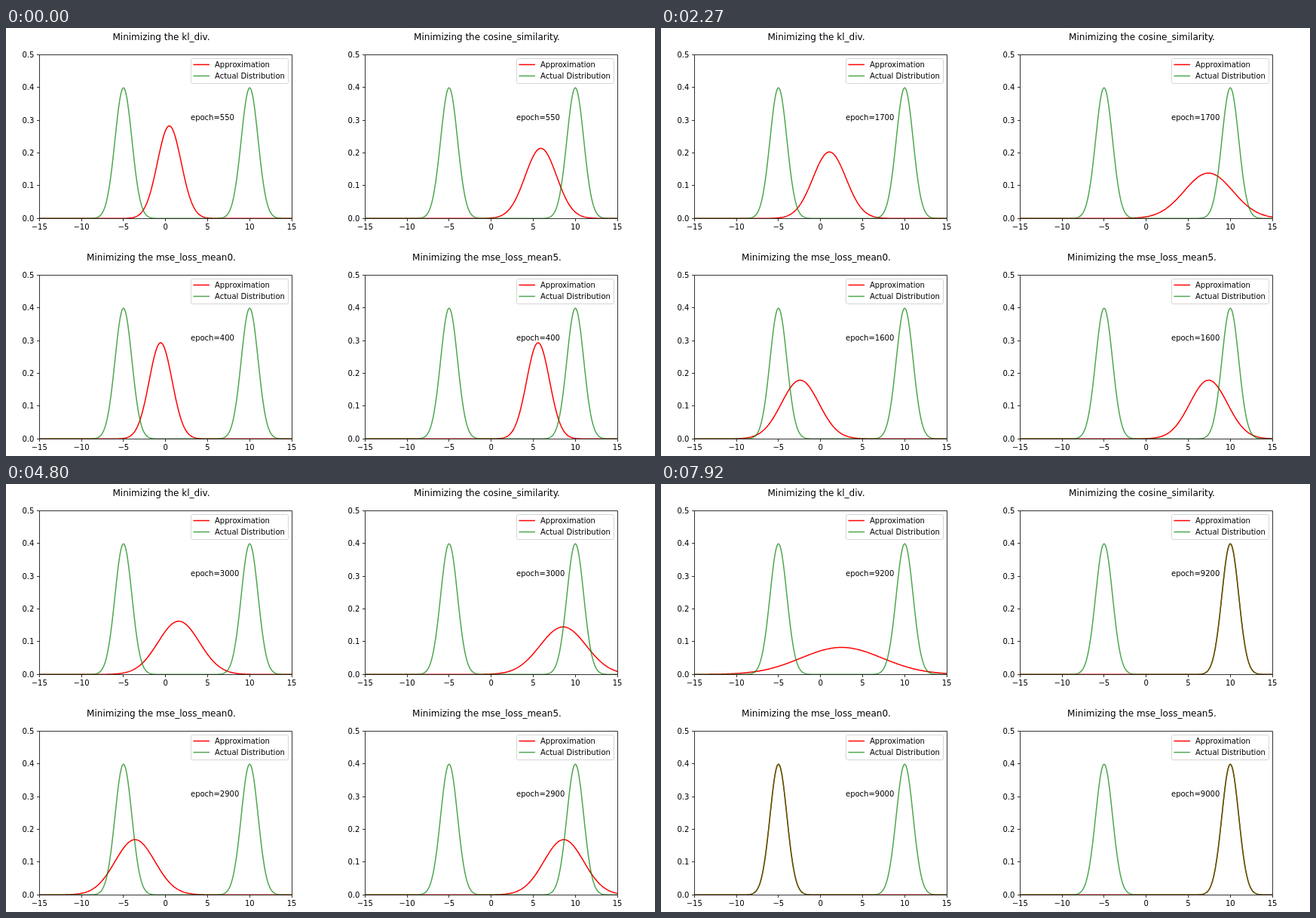
An HTML page with a canvas for the animation above (8 s loop, 861 by 567 pixels).

```html
<!DOCTYPE html>
<html lang="en">
<head>
<meta charset="utf-8">
<title>Minimizing losses</title>
<style>
  html, body { margin: 0; width: 100%; height: 100%; overflow: hidden; background: #fff; }
  canvas { display: block; }
</style>
</head>
<body>
<canvas id="stage" width="861" height="567"></canvas>
<script>
const ctx = document.getElementById('stage').getContext('2d');
const LOOP = 8000, SLOT = LOOP / 105, STEP = 97.5;
const RED = '#f00', GREEN = 'rgba(0,128,0,0.7)';
const AXES = { left: 44.2, bottom: 252.3, width: 334.9, height: 217 };

// Rows of [epoch, mean, sigma]
const KL = [[550, .45, 1.412], [1400, .93, 1.84], [2000, 1.18, 2.083], [2400, 1.36, 2.235],
  [3000, 1.57, 2.455], [7800, 2.45, 4.267], [9200, 2.5, 4.835]];
const COSINE = [[550, 5.91, 1.864], [1400, 7.07, 2.732], [2000, 7.7, 2.96], [2400, 8.04, 2.977],
  [3000, 8.55, 2.75], [4000, 9.4, 2.05], [5000, 9.9, 1.2], [5600, 10, 1], [9200, 10, 1]];
const MSE = [[400, -.58, 1.36], [1300, -2.06, 2.081], [1900, -2.73, 2.333], [2300, -3.1, 2.417],
  [2900, -3.63, 2.367], [3900, -4.4, 1.85], [4900, -4.9, 1.2], [5500, -5, 1], [9200, -5, 1]];
const MSE_MIRRORED = MSE.map(([epoch, mean, sigma]) => [epoch, 5 - mean, sigma]);

// phase and lag are counted in training snapshots
const panels = [
  { x: 0, y: 0, name: 'kl_div', knots: KL, phase: .1, lag: 0 },
  { x: 432, y: 0, name: 'cosine_similarity', knots: COSINE, phase: .1, lag: 0 },
  { x: 0, y: 292, name: 'mse_loss_mean0', knots: MSE, phase: .98, lag: 3 },
  { x: 432, y: 292, name: 'mse_loss_mean5', knots: MSE_MIRRORED, phase: .98, lag: 3 },
];

const toX = v => AXES.left + (v + 15) / 30 * AXES.width;
const toY = v => AXES.bottom - v / .5 * AXES.height;
const crisp = v => Math.floor(v) + .5;
const gauss = (x, mean, sigma) =>
  Math.exp(-(((x - mean) / sigma) ** 2) / 2) / (sigma * Math.sqrt(2 * Math.PI));
const twoPeaks = x => gauss(x, -5, 1) + gauss(x, 10, 1);

function epochAt(n) {
  if (n <= 49) return 550 + 50 * n;
  if (n <= 59) return 3000 + 400 * (n - 49);
  return 7000 + 100 * (n - 59);
}

// Monotone cubic interpolation of one column
function interpolate(knots, epoch, col) {
  const last = knots.length - 2;
  const slope = i => (knots[i + 1][col] - knots[i][col]) / (knots[i + 1][0] - knots[i][0]);
  const tangent = i => {
    if (i === 0) return slope(0);
    if (i > last) return slope(last);
    const a = slope(i - 1), b = slope(i);
    return a * b <= 0 ? 0 : 2 * a * b / (a + b);
  };
  let i = 0;
  while (i < last && epoch > knots[i + 1][0]) i++;
  const h = knots[i + 1][0] - knots[i][0];
  const u = (epoch - knots[i][0]) / h, v = 1 - u;
  return v * v * (1 + 2 * u) * knots[i][col] + u * u * (1 + 2 * v) * knots[i + 1][col]
    + h * u * v * (v * tangent(i) - u * tangent(i + 1));
}

function stroke(color, width) {
  ctx.strokeStyle = color;
  ctx.lineWidth = width;
  ctx.stroke();
}

function line(x1, y1, x2, y2, color, width) {
  ctx.beginPath();
  ctx.moveTo(x1, y1);
  ctx.lineTo(x2, y2);
  stroke(color, width);
}

function text(str, x, y, align = 'left', size = 10) {
  ctx.font = `${size}px "DejaVu Sans", sans-serif`;
  ctx.textAlign = align;
  ctx.fillStyle = '#000';
  ctx.fillText(str, x, y);
}

function curve(f, color) {
  ctx.beginPath();
  for (let i = 0; i <= 300; i++) {
    const x = -15 + i / 10;
    ctx.lineTo(toX(x), toY(f(x)));
  }
  stroke(color, 1.5);
}

function drawAxes() {
  const left = crisp(toX(-15)), bottom = crisp(toY(0));
  ctx.lineCap = 'butt';
  ctx.beginPath();
  ctx.rect(left, crisp(toY(.5)), crisp(toX(15)) - left, crisp(toY(.5)) * -1 + bottom);
  stroke('#000', .8);
  for (let v = -15; v <= 15; v += 5) {
    const x = crisp(toX(v));
    line(x, bottom, x, bottom + 3.5, '#000', .8);
    text(String(v).replace('-', '\u2212'), toX(v), 267, 'center');
  }
  for (let i = 0; i <= 5; i++) {
    const y = crisp(toY(i / 10));
    line(left - 3.5, y, left, y, '#000', .8);
    text((i / 10).toFixed(1), 37.3, Math.round(y + 3.4), 'right');
  }
}

function drawLegend() {
  ctx.beginPath();
  ctx.roundRect(245.5, 40.5, 129, 33, 2);
  ctx.fillStyle = 'rgba(255,255,255,0.8)';
  ctx.fill();
  stroke('rgba(204,204,204,0.8)', 1);
  ctx.lineCap = 'square';
  line(249.2, 48.5, 269.2, 48.5, RED, 1.5);
  line(249.2, 63.5, 269.2, 63.5, GREEN, 1.5);
  text('Approximation', 277, 52);
  text('Actual Distribution', 277, 67);
}

function drawPanel({ x, y, name, knots, phase, lag }, time) {
  const epoch = epochAt(Math.floor(time / STEP + phase) - lag);
  const mean = interpolate(knots, epoch, 1), sigma = interpolate(knots, epoch, 2);
  ctx.save();
  ctx.translate(x, y);

  ctx.save();
  ctx.beginPath();
  ctx.rect(AXES.left, toY(.5), AXES.width, AXES.height);
  ctx.clip();
  ctx.lineJoin = 'round';
  curve(v => gauss(v, mean, sigma), RED);
  curve(twoPeaks, GREEN);
  ctx.restore();

  drawAxes();
  text(`Minimizing the ${name}.`, 206, 16, 'center', 12);
  text(`epoch=${epoch}`, 245, 122);
  drawLegend();
  ctx.restore();
}

function render(now) {
  const slot = Math.floor((now % LOOP + 20) / SLOT) % 105;
  ctx.fillStyle = '#fff';
  ctx.fillRect(0, 0, 861, 567);
  panels.forEach(panel => drawPanel(panel, slot * SLOT));
}

let start;
function tick(now) {
  start ??= now;
  render(now - start);
  requestAnimationFrame(tick);
}
render(0);
requestAnimationFrame(tick);
</script>
</body>
</html>
```
